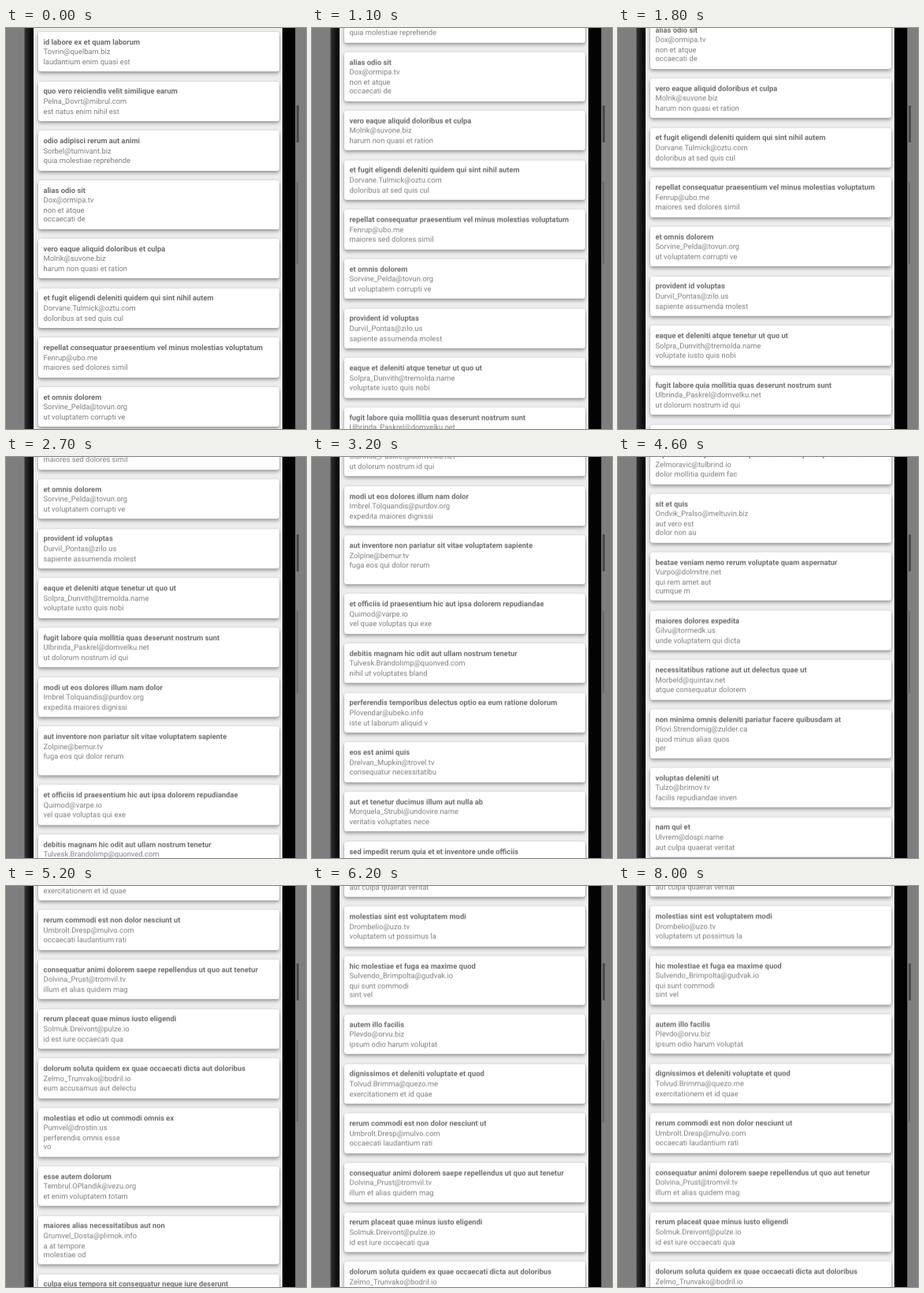
Write an HTML page that moves like this. It is 381x508 px and loops after 8.1 s.

```html
<!DOCTYPE html>
<html lang="la">
<head>
<meta charset="utf-8">
<title>Scrolling comment list</title>
<style>
  html, body { margin: 0; width: 100%; height: 100%; overflow: hidden; background: #7e7e7e; }
  #stage { position: relative; width: 381px; height: 508px; overflow: hidden; }
  .phone { position: absolute; left: 23px; top: 0; width: 345px; height: 508px;
    box-sizing: border-box; border: solid #555; border-width: 0 1px;
    background: linear-gradient(90deg, #303030, #101010 7px, #030303 11px); }
  .key { position: absolute; left: 369px; width: 3px; border-radius: 0 1px 1px 0; }
  .power { top: 98px; height: 47px; background: #4a4a4a; }
  .volume { top: 195px; height: 104px; width: 2px; background: #686868; }
  .screen { position: absolute; left: 35px; top: 0; width: 316px; height: 508px;
    overflow: hidden; background: #ededed; }
  #list { position: absolute; left: 5.5px; top: 5px; width: 305.5px; will-change: transform; }
  .card { margin-bottom: 12.3125px; padding: 7.75px 6.5px 6.25px; border-radius: 3px; background: #fff;
    box-shadow: 0 2.5px 4px rgba(0, 0, 0, .35), 0 0 3px rgba(0, 0, 0, .12);
    font: 9.4px/11.1875px Roboto, sans-serif; color: #7e7e7e;
    white-space: pre; text-rendering: geometricPrecision; }
  .card div + div { margin-top: 1.40625px; }
  .card div:first-child { font-weight: 700; color: #6e6e6e; }
</style>
</head>
<body>
<div id="stage">
  <div class="phone"></div>
  <div class="key power"></div>
  <div class="key volume"></div>
  <div class="screen"><div id="list"></div></div>
</div>
<script>
// One comment per line: title | address | excerpt, where "/" breaks the line.
const comments = `id labore ex et quam laborum|Tovrin@quelbam.biz|laudantium enim quasi est
quo vero reiciendis velit similique earum|Pelna_Dovrt@mibrul.com|est natus enim nihil est
odio adipisci rerum aut animi|Sorbel@tumivant.biz|quia molestiae reprehende
alias odio sit|Dox@ormipa.tv|non et atque/occaecati de
vero eaque aliquid doloribus et culpa|Molrik@suvone.biz|harum non quasi et ration
et fugit eligendi deleniti quidem qui sint nihil autem|Dorvane.Tulmick@oztu.com|doloribus at sed quis cul
repellat consequatur praesentium vel minus molestias voluptatum|Fenrup@ubo.me|maiores sed dolores simil
et omnis dolorem|Sorvine_Pelda@tovun.org|ut voluptatem corrupti ve
provident id voluptas|Durvil_Pontas@zilo.us|sapiente assumenda molest
eaque et deleniti atque tenetur ut quo ut|Solpra_Dunvith@tremolda.name|voluptate iusto quis nobi
fugit labore quia mollitia quas deserunt nostrum sunt|Ulbrinda_Paskrel@domvelku.net|ut dolorum nostrum id qui
modi ut eos dolores illum nam dolor|Imbrel.Tolquandis@purdov.org|expedita maiores dignissi
aut inventore non pariatur sit vitae voluptatem sapiente|Zolpine@bemur.tv|fuga eos qui dolor rerum/
et officiis id praesentium hic aut ipsa dolorem repudiandae|Quimod@varpe.io|vel quae voluptas qui exe
debitis magnam hic odit aut ullam nostrum tenetur|Tulvesk.Brandolimp@quonved.com|nihil ut voluptates bland
perferendis temporibus delectus optio ea eum ratione dolorum|Plovendar@ubeko.info|iste ut laborum aliquid v
eos est animi quis|Drelvan_Mupkin@trovel.tv|consequatur necessitatibu
aut et tenetur ducimus illum aut nulla ab|Morquela_Strubi@undovire.name|veritatis voluptates nece
sed impedit rerum quia et et inventore unde officiis|Ostrilda.Pumvekto@felquo.biz|doloribus est illo sed mi
molestias expedita iste aliquid voluptates|Belundo_Ysk@grelvan.org|qui harum consequatur fug
aliquid rerum mollitia qui a consectetur eum sed|Tulvam@sorbind.me|deleniti aut sed molestia
porro repellendus aut tempore quis hic|Brodun@ulvap.co.uk|qui ipsa animi nostrum pr
quis tempora quidem nihil iste|Veltro@ombiral.co.uk|voluptates provident repe
in tempore eos beatae est|Mondrup@pelzo.us|repudiandae repellat quia
autem ab ea sit alias hic provident sit|Ostelp_Brunk@dovimat.net|sunt aut quae laboriosam
in deleniti sunt provident soluta ratione veniam quam praesentium|Tremol.Quiddo@zolvant.io|incidunt sapiente eaque d
doloribus quibusdam molestiae amet illum|Bulvendor.Mispeth@trula.us|nisi vel quas ut laborum
quo voluptates voluptas nisi veritatis dignissimos dolores ut officiis|Fenvo@dulqui.org|voluptatem repellendus qu
eum distinctio amet dolor|Gulvanes_Truvo@ovzik.biz|tempora voluptatem est/ma
quasi nulla ducimus facilis non voluptas aut|Plindor@zumvel.biz|consequuntur quia volupta
ex velit ut cum eius odio ad placeat|Vostek@glimpor.biz|quia incidunt ut/aliquid
dolorem architecto ut pariatur quae qui suscipit|Dulmi@sorvet.name|nihil ea itaque libero il
voluptatum totam vel voluptate omnis|Brelm.Oskud@tivuma.tv|fugit harum quae vero/lib
omnis nemo sunt ab autem|Quolvin.Strumbeld@opidra.co.uk|omnis temporibus quasi ab
repellendus sapiente omnis praesentium aliquam ipsum id molestiae omnis|Zelmoravic@tulbrind.io|dolor mollitia quidem fac
sit et quis|Ondvik_Pralso@meltuvin.biz|aut vero est/dolor non au
beatae veniam nemo rerum voluptate quam aspernatur|Vurpo@dolmitre.net|qui rem amet aut/cumque m
maiores dolores expedita|Gilvu@tormedk.us|unde voluptatem qui dicta
necessitatibus ratione aut ut delectus quae ut|Morbeld@quintav.net|atque consequatur dolorem
non minima omnis deleniti pariatur facere quibusdam at|Plovi.Strendomig@zulder.ca|quod minus alias quos/per
voluptas deleniti ut|Tulzo@brimov.tv|facilis repudiandae inven
nam qui et|Ulvrem@dospi.name|aut culpa quaerat veritat
molestias sint est voluptatem modi|Drombelio@uzo.tv|voluptatem ut possimus la
hic molestiae et fuga ea maxime quod|Sulvendo_Brimpolta@gudvak.io|qui sunt commodi/sint vel
autem illo facilis|Plevdo@orvu.biz|ipsum odio harum voluptat
dignissimos et deleniti voluptate et quod|Tolvud.Brimma@quezo.me|exercitationem et id quae
rerum commodi est non dolor nesciunt ut|Umbrolt.Dresp@mulvo.com|occaecati laudantium rati
consequatur animi dolorem saepe repellendus ut quo aut tenetur|Dolvina_Prust@tromvil.tv|illum et alias quidem mag
rerum placeat quae minus iusto eligendi|Solmuk.Dreivont@pulze.io|id est iure occaecati qua
dolorum soluta quidem ex quae occaecati dicta aut doloribus|Zelmo_Trunvako@bodril.io|eum accusamus aut delectu
molestias et odio ut commodi omnis ex|Pumvel@drostin.us|perferendis omnis esse/vo
esse autem dolorum|Tembrul.OPlandik@vezu.org|et enim voluptatem totam
maiores alias necessitatibus aut non|Grumvel_Dosta@plimok.info|a at tempore/molestiae od
culpa eius tempora sit consequatur neque iure deserunt|Brosta_Quelvimpart@zondrulm.com|et ipsa rem ullam cum par
quas pariatur quia a doloribus|Mulvek_Trando@pilzor.me|perferendis eaque labore`;

const list = document.getElementById('list');

function addLine(card, text) {
  const line = document.createElement('div');
  line.textContent = text;
  card.append(line);
}

for (const comment of comments.split('\n')) {
  const [title, address, excerpt] = comment.split('|');
  const card = document.createElement('div');
  card.className = 'card';
  addLine(card, title);
  addLine(card, address);
  addLine(card, excerpt.replace('/', '\n') + '\u200b'); // keeps a trailing empty line
  list.append(card);
}

// Scroll path as [ms, px]: three swipes down, one back up.
const LOOP = 8100, STEP = 100;
const path = [
  [0, 0], [400, 0], [800, 95], [1200, 175], [1800, 203.2], [2100, 203.2],
  [2700, 426.8], [3100, 640], [3500, 720], [3600, 720], [3900, 876.2],
  [4400, 1800], [4800, 2560], [5200, 2958.8], [5400, 2991], [5800, 2780],
  [6200, 2701.3], [6500, 2701.6], [LOOP, 2701.6]
];
const slopes = path.slice(1).map(([t, y], i) => (y - path[i][1]) / (t - path[i][0]));

// Harmonic mean of the neighbouring slopes: smooth, without overshoot.
function tangent(i) {
  const a = slopes[i - 1] || 0, b = slopes[i] || 0;
  return a * b > 0 ? 2 * a * b / (a + b) : 0;
}

function scrollAt(time) {
  const i = path.findIndex(([t]) => t > time) - 1;
  const [t0, y0] = path[i], [t1, y1] = path[i + 1];
  const span = t1 - t0, u = (time - t0) / span, v = 1 - u;
  return y0 * v * v * (1 + 2 * u) + y1 * u * u * (3 - 2 * u)
    + span * u * v * (tangent(i) * v - tangent(i + 1) * u);
}

const start = performance.now();

function draw() {
  const elapsed = performance.now() - start + 10;
  const time = Math.floor(elapsed / STEP) * STEP % LOOP;
  list.style.transform = `translateY(${-scrollAt(time)}px)`;
  requestAnimationFrame(draw);
}
draw();
</script>
</body>
</html>
```
